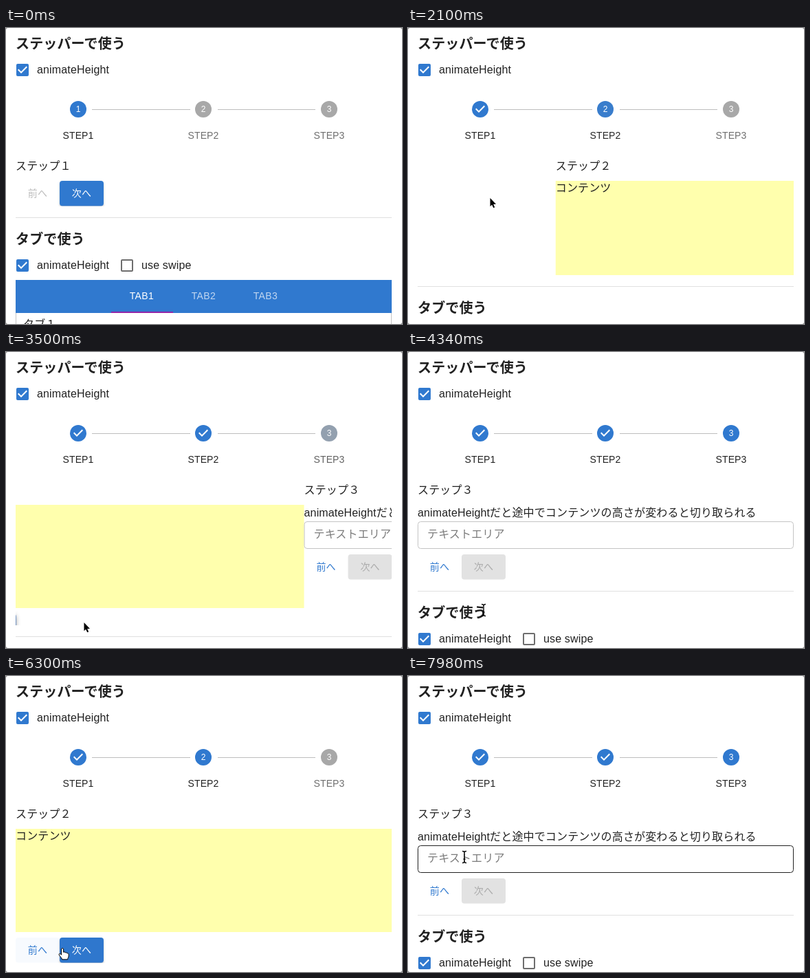
An HTML page that plays this animation: 576x430 px, repeating every 8 s.

```html
<!DOCTYPE html>
<html lang="ja">
<head>
<meta charset="utf-8">
<title>Stepper and tabs</title>
<style>
html, body { margin: 0; width: 100%; height: 100%; overflow: hidden; background: #8c8c8c; }
svg { display: block; width: 576px; height: 430px; }
text { font: 16px "Liberation Sans", "Noto Sans CJK JP", "Noto Sans CJK", sans-serif; letter-spacing: .15px; fill: #212121; white-space: pre; }
.head { font-size: 20px; font-weight: 700; }
.small { font-size: 14px; text-anchor: middle; }
.num { font-size: 12px; text-anchor: middle; fill: #fff; letter-spacing: 0; }
.tab { font-size: 14px; text-anchor: middle; letter-spacing: .4px; fill: #fff; }
</style>
</head>
<body>
<svg id="stage" viewBox="0 0 576 430"></svg>
<script>
const LOOP = 8000, BLUE = '#3079cf', LEFT = 14, WIDTH = 547;
const CLICKS = { first: 2000, second: 3467.8, back: 5170.3, again: 6954 };
const DIVIDERS = [275, 433, 347];
const CIRCLES = [105, 287, 470];

const clamp = v => Math.max(0, Math.min(1, v));
const mix = (a, b, k) => a + (b - a) * k;
const blend = (a, b, k) => `rgb(${a.map((v, i) => Math.round(mix(v, b[i], k)))})`;

function bezier(x1, y1, x2, y2) {
  const at = (a, b, s) => 3 * (1 - s) * (1 - s) * s * a + 3 * (1 - s) * s * s * b + s * s * s;
  return v => {
    const x = clamp(v);
    if (x === 0 || x === 1) return x;
    let lo = 0, hi = 1;
    for (let i = 0; i < 24; i++) {
      const mid = (lo + hi) / 2;
      if (at(x1, x2, mid) < x) lo = mid; else hi = mid;
    }
    return at(y1, y2, lo);
  };
}
const slideEase = bezier(.15, .3, .25, 1);
const ease = bezier(.4, 0, .2, 1);

// Markup helpers
const CHECK = '<path d="M-2 5L-7 0l1.4-1.4L-2 2.2l7.6-7.6L7-4z" fill="#fff"/>';
const text = (x, y, str, cls = '', extra = '') => `<text x="${x}" y="${y}" class="${cls}" ${extra}>${str}</text>`;
const checkbox = (x, y, on) => `<g transform="translate(${x} ${y})">` + (on
  ? `<rect x="-9" y="-9" width="18" height="18" rx="2" fill="${BLUE}"/>${CHECK}`
  : '<rect x="-8" y="-8" width="16" height="16" rx="1" fill="none" stroke="#6e6e6e" stroke-width="2"/>') + '</g>';
const button = (id, x, y, label, fill, ink) => `<g transform="translate(${x} ${y})">
  <rect id="${id}" width="64" height="36.5" rx="4" fill="${fill}"/>
  ${text(32, 23.3, label, 'small', `style="fill:${ink}"`)}
  <g clip-path="url(#btn)"><circle id="${id}Ripple" r="0" fill="${fill === 'none' ? BLUE : '#fff'}"/></g></g>`;

const circles = CIRCLES.map((x, i) => `<g transform="translate(${x} 118)">
  <circle id="dot${i}" r="12"/>
  <g id="num${i}">${text(0, 4.3, i + 1, 'num')}</g><g id="tick${i}">${CHECK}</g></g>
  ${text(x, 161, 'STEP' + (i + 1), 'small', `id="label${i}"`)}`).join('');

const slides = [
  text(0, 206, 'ステップ１') +
    button('prev1', 0, 222, '前へ', 'none', '#bdbdbd') + button('next1', 64, 222, '次へ', BLUE, '#fff'),
  text(0, 206, 'ステップ２') + `<rect y="222" width="${WIDTH}" height="150" fill="#ffffad"/>` + text(0, 238, 'コンテンツ') +
    button('prev2', 0, 380, '前へ', 'none', BLUE) + button('next2', 64, 380, '次へ', BLUE, '#fff'),
  text(0, 206, 'ステップ３') + text(0, 238.5, 'animateHeightだと途中でコンテンツの高さが変わると切り取られる') +
    '<rect id="field" x=".5" y="246.5" width="546" height="39" rx="4" fill="none"/>' +
    text(14, 270, 'テキストエリア', '', 'style="fill:#7c7c7c"') +
    button('prev3', 0, 294, '前へ', 'none', BLUE) + button('next3', 64, 294, '次へ', '#e2e2e2', '#ababab')
].map((body, i) => `<g id="slide${i}">${body}</g>`).join('');

const tabs = ['TAB1', 'TAB2', 'TAB3'].map((s, i) => text(197.5 + 90 * i, 119, s, 'tab', i ? 'opacity=".7"' : '')).join('');

document.getElementById('stage').innerHTML = `
<defs>
  <clipPath id="btn"><rect width="64" height="36.5" rx="4"/></clipPath>
  <clipPath id="view"><rect id="viewBox" x="${LEFT}" y="180" width="${WIDTH}"/></clipPath>
</defs>
<rect width="576" height="430" rx="3" fill="#fff"/>
${text(14, 29.5, 'ステッパーで使う', 'head')}
${checkbox(24, 61, true)}${text(45, 66.3, 'animateHeight')}
<path d="M125 118.5H268M308 118.5H450" stroke="#bdbdbd"/>
${circles}
<g clip-path="url(#view)">${slides}</g>
<g id="lower">
  <path d="M14 .5H561" stroke="#e0e0e0"/>
  ${text(14, 38.5, 'タブで使う', 'head')}
  ${checkbox(24, 70, true)}${text(45, 75.3, 'animateHeight')}
  ${checkbox(176, 70, false)}${text(197, 75.3, 'use swipe')}
  <path d="M14.5 139V400M560.5 139V400" stroke="#c4c4c4"/>
  <rect x="14" y="91" width="547" height="48" fill="${BLUE}"/>
  <rect x="153" y="137" width="90" height="2" fill="#9126a8"/>
  ${tabs}${text(25, 161, 'タブ１')}
</g>
<g id="cursor">
  <path id="arrow" d="M.5 1V13.2L3.1 10.7 5.2 15.3 7.2 14.5 5.2 10H9Z" fill="#000" stroke="#fff" stroke-width="1.6" paint-order="stroke"/>
  <path id="hand" d="M-1.5 1C-1.5-.7 1.5-.7 1.5 1V5.5C2.5 4.8 4 5 4.3 6.2 5.3 5.6 6.6 6 6.8 7 8 6.6 9 7.3 9 8.5V11C9 13 7.5 14 7.5 16H-.5C-.8 13.5-4 11.5-5 9-5.4 7.5-3.5 7-2.5 8.2L-1.5 9.3Z" fill="#fff" stroke="#000"/>
  <path id="beam" d="M-3-8.5Q0-8.5 0-6.5 0-8.5 3-8.5M0-6.5V6.5M-3 8.5Q0 8.5 0 6.5 0 8.5 3 8.5M-1.5 3H1.5" fill="none" stroke="#000" stroke-width="1.4"/>
</g>`;

const ui = {};
document.querySelectorAll('[id]').forEach(n => ui[n.id] = n);
const set = (id, attrs) => { for (const k in attrs) ui[id].setAttribute(k, attrs[k]); };
const show = (id, on) => set(id, { visibility: on ? 'visible' : 'hidden' });

// time, x, y
const PATH = [
  [70, 320, 436], [840, 100, 221], [1120, 190, 375], [1260, 190, 375], [1610, 119, 246],
  [2610, 119, 246], [2810, 117, 363], [2900, 117, 363], [3080, 113, 392],
  [4080, 113, 392], [4340, 110, 375], [4760, 50, 311],
  [5500, 50, 311], [5840, 46, 371], [6080, 54, 395], [6580, 122, 397],
  [7640, 122, 397], [7960, 82, 263]
];
// Pointer-over spans per control
const HOVERS = {
  next1: [[1490, 2020]], next2: [[2960, 3490], [6260, 6975]],
  prev2: [[5900, 6260]], prev3: [[4640, 5190]]
};
const BEAMS = [[4200, 4410], [7880, LOOP]];
// control, press, release, x, y inside the button
const PRESSES = [
  ['next1', 1860, CLICKS.first, 41, 24], ['next2', 3320, CLICKS.second, 35, 12],
  ['prev3', 5045, CLICKS.back, 36, 17], ['next2', 6765, CLICKS.again, 44, 17]
];

function pointAt(t) {
  let i = PATH.findIndex(k => k[0] > t);
  if (i < 0) return PATH[PATH.length - 1].slice(1);
  if (i === 0) i = 1;
  const a = PATH[i - 1], b = PATH[i], u = clamp((t - a[0]) / (b[0] - a[0])), k = u * u * (3 - 2 * u);
  return [mix(a[1], b[1], k), mix(a[2], b[2], k)];
}

function drawStepper(t) {
  const after = c => ease((t - c) / 150), past = c => t >= c ? 1 : 0;
  const sum = f => f(CLICKS.second) - f(CLICKS.back) + f(CLICKS.again);
  const step = past(CLICKS.first) + sum(past);
  [1, after(CLICKS.first), sum(after)].forEach((on, i) => {
    set('dot' + i, { fill: blend([168, 168, 168], [48, 121, 207], on) });
    ui['label' + i].style.fill = blend([110, 110, 110], [33, 33, 33], on);
    show('num' + i, i >= step);
    show('tick' + i, i < step);
  });
}

function drawSlides(t) {
  const move = c => slideEase((t - c) / 350);
  const pos = move(CLICKS.first) + move(CLICKS.second) - move(CLICKS.back) + move(CLICKS.again);
  const i = Math.min(1, Math.floor(pos));
  const y = Math.round(mix(DIVIDERS[i], DIVIDERS[i + 1], pos - i));
  for (let n = 0; n < 3; n++) set('slide' + n, { transform: `translate(${LEFT + WIDTH * (n - pos)} 0)` });
  set('viewBox', { height: y - 16 - 180 });
  set('lower', { transform: `translate(0 ${y})` });
}

function drawControls(t) {
  for (const id in HOVERS) {
    const k = HOVERS[id].reduce((s, [a, b]) => s + ease((t - a) / 250) - ease((t - b) / 250), 0);
    if (id.startsWith('prev')) set(id, { fill: BLUE, 'fill-opacity': .04 * k });
    else {
      set(id, { fill: blend([48, 121, 207], [40, 101, 186], k) });
      ui[id].style.filter = `drop-shadow(0 ${2 + k}px ${1.5 + 1.5 * k}px rgba(0,0,0,${.2 + .2 * k}))`;
    }
  }
  PRESSES.forEach(([id]) => set(id + 'Ripple', { r: 0 }));
  for (const [id, down, up, x, y] of PRESSES) {
    if (t < down || t > up + 550) continue;
    const grow = ease((t - down) / 550);
    const r = Math.hypot(Math.max(x, 64 - x) + 1, Math.max(y, 36 - y) + 1);
    set(id + 'Ripple', { cx: x, cy: y, r: r * grow, opacity: (.1 + .16 * grow) * (1 - ease((t - up) / 550)) });
  }
  set('field', { stroke: t >= 7900 ? '#212121' : '#c4c4c4' });
}

function drawCursor(t) {
  const within = ([a, b]) => t >= a && t < b;
  const beam = BEAMS.some(within), hand = !beam && Object.values(HOVERS).flat().some(within);
  const [x, y] = pointAt(t), on = t >= 70;
  set('cursor', { transform: `translate(${x} ${y})` });
  show('beam', on && beam);
  show('hand', on && hand);
  show('arrow', on && !beam && !hand);
}

function draw(t) {
  drawStepper(t);
  drawSlides(t);
  drawControls(t);
  drawCursor(t);
}

const start = performance.now();
function tick() {
  draw((performance.now() - start) % LOOP);
  requestAnimationFrame(tick);
}
draw(0);
requestAnimationFrame(tick);
</script>
</body>
</html>
```
